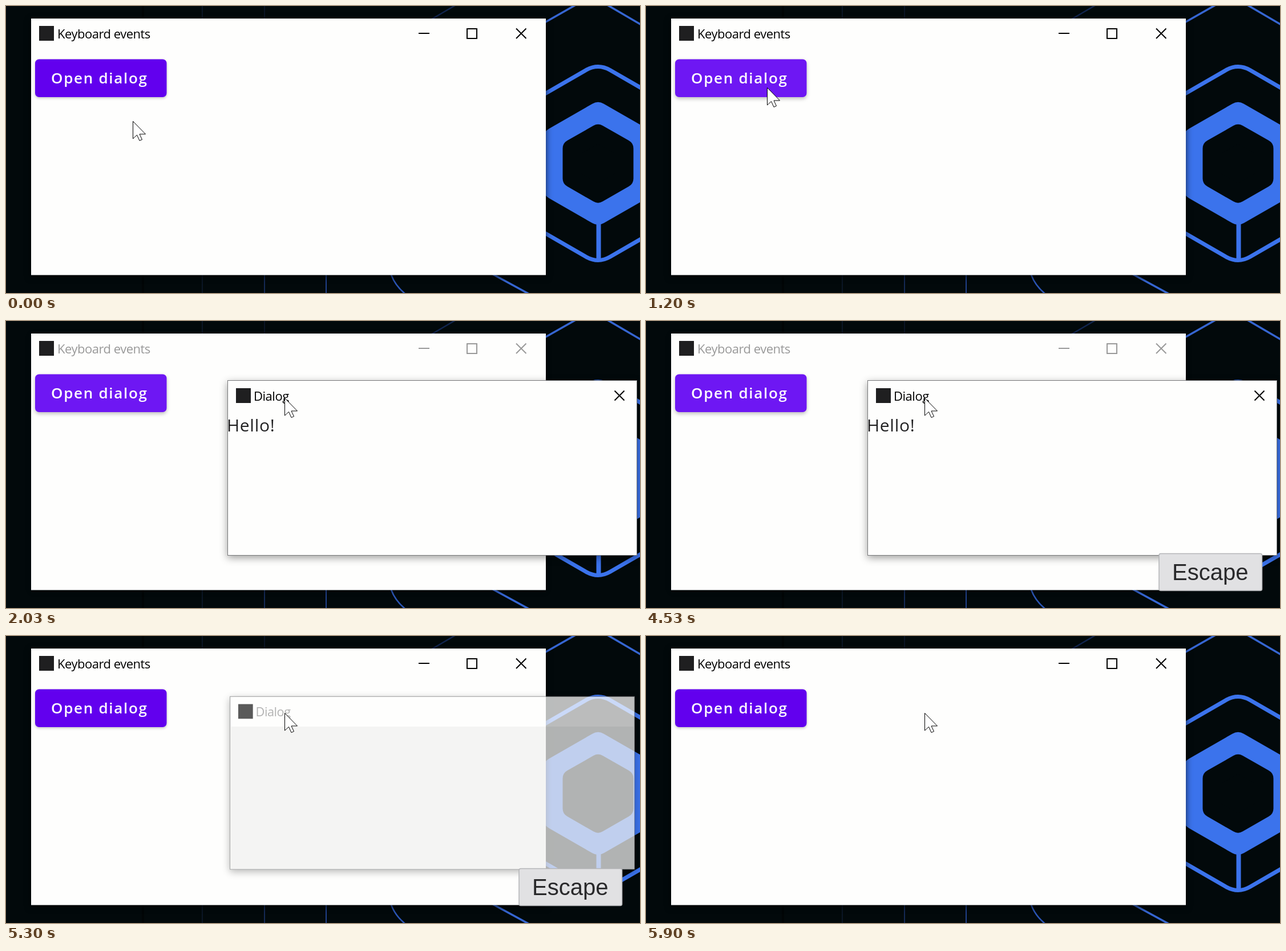
An HTML page for the animation above (8000 ms loop, 1111 by 504 pixels).

```html
<!DOCTYPE html>
<html lang="en">
<head>
<meta charset="utf-8">
<title>Keyboard events</title>
<style>
  html, body { margin: 0; width: 100%; height: 100%; overflow: hidden; background: #02090b; }
  svg { display: block; width: 100%; height: 100%; }
  text { font-family: "Open Sans", "Noto Sans", sans-serif; }
  .title { font-size: 22px; letter-spacing: -.5px; fill: currentColor; }
  .controls { fill: none; stroke: currentColor; stroke-width: 2; }
  .lines { fill: none; stroke: #3b73ec; }
  .round { stroke-linejoin: round; }
  #main { color: #000; filter: drop-shadow(0 3px 6px rgba(0, 0, 0, .7)); }
  #main.inactive { color: #999; filter: drop-shadow(0 2px 4px rgba(0, 0, 0, .4)); }
  #button { fill: #6200ee; filter: drop-shadow(0 2px 2px rgba(0, 0, 0, .22)); }
  #button.hover { fill: #6e17f3; filter: drop-shadow(0 3px 3px rgba(0, 0, 0, .25)); }
  #dialog { color: #000; transform-origin: 747px 258px; filter: drop-shadow(0 4px 7px rgba(0, 0, 0, .38)); }
  #dialog.closing { color: #999; }
  #blank, .closing #content { display: none; }
  .closing #blank { display: inline; }
</style>
</head>
<body>
<svg viewBox="0 0 1111 504">
  <rect width="1111" height="504" fill="#02090b"/>
  <g class="lines">
    <path d="M240 0V504" stroke="#010506" stroke-width="4"/>
    <path d="M344 0V504" stroke="#0b1625" stroke-width="2"/>
    <path d="M453 472V504" stroke="#142a55" stroke-width="2"/>
    <path d="M453 0V22" stroke="#0a1424" stroke-width="2"/>
    <path d="M561 472V504" stroke="#20418b" stroke-width="2"/>
    <path d="M675 472Q682 491 699 505" stroke="#2b55b4" stroke-width="2.5"/>
    <path d="M746 23L787 -1" stroke="#11254f" stroke-width="2.5"/>
    <path d="M853 471L917 506M944 29L1002 -4M1050 -4L1113 33" stroke="#3666d2" stroke-width="3.5"/>
    <path d="M940 156.8L1016.5 112.5Q1037.5 100.5 1058.5 112.5L1115 145.2
             M940 396.2L1016.5 440.5Q1037.5 452.5 1058.5 440.5L1115 407.8" stroke-width="7"/>
    <path d="M1038.5 380V447" stroke-width="8"/>
  </g>
  <g class="round">
    <path d="M1037.5 189L1113.5 232.8V320.2L1037.5 364L961.5 320.2V232.8Z" fill="#3b73ec" stroke="#3b73ec" stroke-width="40"/>
    <path d="M1037.5 224L1083.5 250.2V303L1037.5 329.5L991.5 303V250.2Z" fill="#02090b" stroke="#02090b" stroke-width="32"/>
  </g>

  <g id="main">
    <rect x="44" y="22" width="902" height="450.5" fill="#fefefd"/>
    <rect x="58" y="35" width="26" height="26" fill="#1f1f20"/>
    <text class="title" x="90" y="57">Keyboard events</text>
    <path class="controls" d="M723 48H742M808 40H825V57H808ZM894 39.5L911.5 57M911.5 39.5L894 57"/>
    <rect id="button" x="51" y="93.5" width="230.5" height="66.5" rx="7"/>
    <text x="79" y="136" font-size="26" font-weight="600" letter-spacing="1.7" fill="#fff">Open dialog</text>
  </g>

  <g id="dialog">
    <rect x="388.5" y="104.5" width="717" height="307" fill="#fefefd" stroke="#77787a"/>
    <rect x="403" y="118" width="26" height="26" fill="#1f1f20"/>
    <text class="title" x="434" y="140">Dialog</text>
    <rect id="blank" x="389" y="158" width="716" height="253" fill="#f1f1f0"/>
    <g id="content">
      <path class="controls" d="M1066.5 122.5L1083.5 139.5M1083.5 122.5L1066.5 139.5"/>
      <text x="387" y="194" font-size="30" letter-spacing=".7" fill="#212122">Hello!</text>
    </g>
  </g>

  <g id="key">
    <rect x="899" y="408.5" width="180.5" height="65" rx="3" fill="#e1e1e3" stroke="#b3b4b7" stroke-width="1.5"/>
    <text x="922" y="455" font-size="40" fill="#29292b" style="font-family: 'Liberation Sans', Arial, sans-serif">Escape</text>
  </g>
  <path id="pointer" d="M.5 .5V31L7.5 24.5L12 34.5L16.5 32.5L12 23H22.5Z" fill="#fff" stroke="#000"/>
</svg>
<script>
  const LOOP = 8000;
  const OPEN = 1690, CLOSE = 5200, CLOSED = 5430;
  const [main, button, dialog, key, pointer] =
    ['main', 'button', 'dialog', 'key', 'pointer'].map(id => document.getElementById(id));

  const progress = (t, from, to) => Math.min(1, Math.max(0, (t - from) / (to - from)));
  const smooth = p => p * p * (3 - 2 * p);
  const show = (node, on) => { node.style.display = on ? '' : 'none'; };

  function render(t) {
    const approach = smooth(progress(t, 760, 1200));
    const leave = smooth(progress(t, 1600, 2030));
    const x = 222 - 10 * approach + 276 * leave;
    const y = 202 - 59 * approach - 8 * leave;
    pointer.setAttribute('transform', `translate(${x} ${y})`);

    const closing = t >= CLOSE;
    main.classList.toggle('inactive', t >= OPEN && !closing);
    button.classList.toggle('hover', y < 160 && !closing);
    dialog.classList.toggle('closing', closing);

    // The dialog fades in with a slight growth and leaves the same way.
    const away = closing
      ? progress(t, CLOSE, CLOSED) ** 1.6
      : (1 - progress(t, OPEN, 1920)) ** 2;
    show(dialog, t >= OPEN && t < CLOSED);
    dialog.style.opacity = 1 - away;
    dialog.style.transform = `scale(${1 - (closing ? .043 : .08) * away})`;

    show(key, t >= 4530 && t < 5900);
  }

  const start = performance.now();
  function tick() {
    render((performance.now() - start) % LOOP);
    requestAnimationFrame(tick);
  }
  tick();
</script>
</body>
</html>
```
